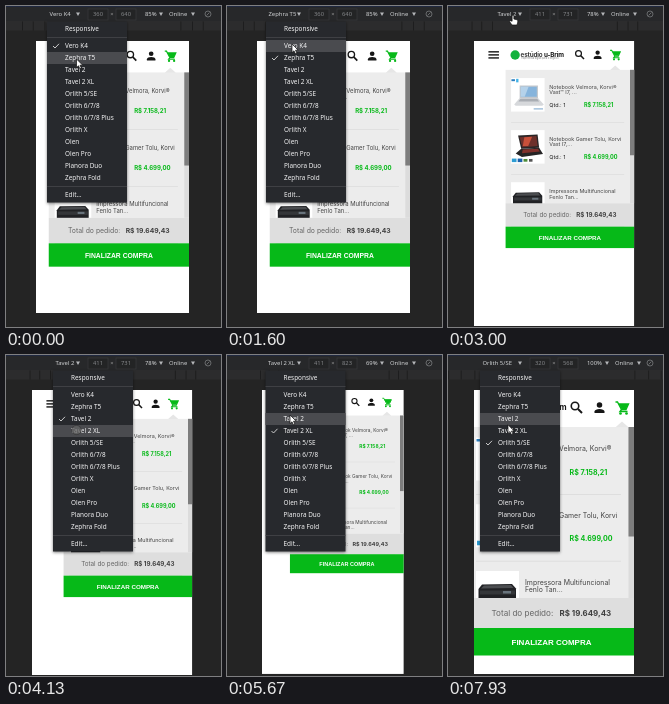
These frames come from a looping animation (215x321 px, 8000 ms). An HTML page:

```html
<!DOCTYPE html>
<html lang="pt">
<head>
<meta charset="utf-8">
<title>Device toolbar</title>
<style>
html, body { margin: 0; width: 100%; height: 100%; overflow: hidden; background: #242424; }
#stage { display: block; width: 215px; height: 321px; font-family: "Noto Sans", sans-serif; }
.shop { font-family: Inter, sans-serif; }
.button { font-family: "Liberation Sans", Arial, sans-serif; }
.menu { filter: drop-shadow(0 1px 1.5px rgba(0, 0, 0, .5)); }
</style>
</head>
<body>
<svg id="stage" viewBox="0 0 215 321"></svg>
<script>
const LOOP = 8000, TICKS = 120;
const CENTER = 106.5, PAGE_TOP = 35, MENU_WIDTH = 80;
const GREEN = '#06b918';

const NAMES = ['Vero K4', 'Zephra T5', 'Tavel 2', 'Tavel 2 XL', 'Orlith 5/SE', 'Orlith 6/7/8',
  'Orlith 6/7/8 Plus', 'Orlith X', 'Olen', 'Olen Pro', 'Planora Duo', 'Zephra Fold'];

// left: menu edge, gutter: extra header padding
const DEVICES = [
  { w: 360, h: 640, zoom: 85, left: 41, gutter: 20 },
  { w: 360, h: 640, zoom: 85, left: 39, gutter: 20 },
  { w: 411, h: 731, zoom: 78, left: 47, gutter: 25 },
  { w: 411, h: 823, zoom: 69, left: 38.5, gutter: 25 },
  { w: 320, h: 568, zoom: 100, left: 32, gutter: 0 },
];
const SWITCHES = [1, 32, 63, 96];
const OPENINGS = [[0, 1], [22, 32], [48, 63], [81, 96], [112, 120]];

// Pointer path: [tick, x, y]
const PATH = [
  [0, 70.5, 53], [8, 70.5, 53], [9, 66, 37], [11, 66, 37], [19, 62, 8], [21, 62, 8],
  [24, 65, 38], [28, 69, 63], [36, 69, 63], [40, 62, 34], [45, 65, 9], [47, 65, 9],
  [55, 68, 64], [57, 68, 64], [59, 70.5, 75], [66, 70.5, 75], [72, 62, 36], [77, 60, 7],
  [80, 60, 7], [85, 63, 60], [91, 70.5, 85], [98, 70.5, 85], [106, 57, 13], [115, 57, 13],
  [119, 60, 69.8],
];

const ITEMS = [
  { lines: ['Notebook Velmora, Korvi®', 'Vast™ I7, ...'], price: 'R$ 7.158,21' },
  { lines: ['Notebook Gamer Tolu, Korvi', 'Vast I7,...'], price: 'R$ 4.699,00' },
  { lines: ['Impressora Multifuncional', 'Fenlo Tan...'], price: '' },
];

const rect = (x, y, w, h, fill, more = '') =>
  `<rect x="${x}" y="${y}" width="${w}" height="${h}" fill="${fill}" ${more}/>`;
const path = (d, fill, more = '') => `<path d="${d}" fill="${fill}" ${more}/>`;
const line = (d, color, width) => path(d, 'none', `stroke="${color}" stroke-width="${width}"`);
const circle = (x, y, r, fill, more = '') => `<circle cx="${x}" cy="${y}" r="${r}" fill="${fill}" ${more}/>`;
const text = (x, middle, size, value, fill, more = '') =>
  `<text x="${x}" y="${middle + size * .36}" font-size="${size}" fill="${fill}" ${more}>${value}</text>`;
const group = (x, y, content, more = '') => `<g transform="translate(${x} ${y})" ${more}>${content}</g>`;
const BOLD = 'font-weight="700"';
const MIDDLE = 'text-anchor="middle"';

const PICTURES = [
  rect(1, 3, 9, 5, '#2b7fc0') + rect(13, 2, 6, 9, '#45b4e8') +
    path('M22 19H69V51H22Z', '#c3c7cc') + path('M25 22H66V48H25Z', '#86b4dc') +
    path('M25 22H45L35 48H25Z', '#b5d2ea') +
    path('M22 51H69L84 68L80 71H12L8 68Z', '#d6d8db') + path('M24 53H67L72 60H19Z', '#a9adb3') +
    rect(58, 77, 24, 4, '#a8c4dd'),
  path('M18 14L68 11L72 45L26 48Z', '#2a2627') + path('M22 18L65 15L68 41L29 44Z', '#6d302b') +
    path('M34 18L54 17L44 41L30 41Z', '#c9503a') +
    path('M26 48L72 45L82 61L28 69L12 60Z', '#252425') + path('M30 50L69 48L74 55L28 59Z', '#80312c') +
    rect(2, 73, 12, 9, '#2d9cd2') + rect(17, 73, 12, 9, '#1c62ad') + rect(32, 74, 10, 7, '#4d8b3a') +
    rect(46, 74, 9, 7, '#555'),
  path('M12 27L72 26L80 35V86H5V36Z', '#202124') + path('M16 29L70 28L75 34L10 35Z', '#4b4d50') +
    rect(8, 39, 70, 8, '#343639') + rect(54, 40, 16, 5, '#69747d'),
];

function header({ w, gutter }) {
  const menuX = 11 + gutter, cartX = w - 24 - gutter, ink = '#161616';
  const logoX = (menuX + 28 + cartX - 103) / 2 - 68;
  const bars = [26, 33.8, 41.6].map(y => rect(menuX + 1, y, 27, 3.6, ink)).join('');
  const logo = group(logoX, 35, circle(12, 1, 12, '#12b23c') +
    text(26, -1, 16.2, 'estúdio <tspan fill="#151515">u-Brim</tspan>', '#3b3b3b', BOLD + ' letter-spacing="-.4"') +
    text(28, 10, 6, 'experiência digital para o negócio', '#777'));
  const search = group(cartX - 91, 35,
    circle(-3, -3, 7.5, 'none', `stroke="${ink}" stroke-width="3.2"`) + line('M3 3L11 11', ink, 4));
  const user = group(cartX - 45, 35, circle(0, -5, 5.5, ink) + path('M-10 11V8C-10 1 10 1 10 8V11Z', ink));
  const cart = group(cartX, 35,
    line('M-13-11H-9L-1 4H8L13-7H-7M-1 4L-4 8H11', GREEN, 2.8) + path('M-7-7H13L8 3H-1Z', GREEN) +
    circle(-3, 12, 2.7, GREEN) + circle(9, 12, 2.7, GREEN));
  const caret = path(`M${cartX - 13} 74.5L${cartX} 63L${cartX + 13} 74.5Z`, '#e6e6e6');
  return bars + logo + search + user + cart + caret;
}

function cartItem({ lines, price }, i) {
  const content = rect(14, 21, 86, 86, '#fff') + group(14, 21, PICTURES[i]) +
    lines.map((value, n) => text(112, 43 + n * 15, 13.9, value, '#444')).join('') +
    text(112, 90, 14, 'Qtd.: 1', '#222') + text(201, 90, 14.2, price, GREEN, BOLD) +
    rect(14, 134, 290, 1.5, '#dadada');
  return group(0, 74 + i * 133.5, content);
}

function page(device) {
  const { w, h, zoom } = device, scale = zoom / 200;
  const panel = rect(0, 74, 330, 342, '#ececec') + ITEMS.map(cartItem).join('') +
    rect(319, 74, 11, 342, '#dcdcdc') + rect(319, 74, 11, 219, '#7d7d7d') +
    rect(0, 416, 330, 60, '#dedede') +
    text(45, 446, 16.2, 'Total do pedido:', '#666') + text(181, 446, 15.9, 'R$ 19.649,43', '#3f3f3f', BOLD) +
    rect(0, 476, 330, 55, GREEN) +
    text(165, 504, 16, 'FINALIZAR COMPRA', '#fff', `${BOLD} ${MIDDLE} class="button"`);
  const left = Math.floor(CENTER - w * scale / 2);
  return `<svg class="shop" x="${left}" y="${PAGE_TOP}" width="${w * scale}" height="${h * scale}" viewBox="0 0 ${w} ${h}">` +
    rect(0, 0, w, h, '#fff') + group(w - 330, 0, panel) + header(device) + '</svg>';
}

function toolbar(index) {
  const { w, h, zoom, left } = DEVICES[index], ink = '#d2d4d6';
  const shift = zoom === 100 ? 4 : 0;
  const arrow = x => path(`M${x - 2} 6.6h4l-2 3.4z`, '#b5b7ba');
  const field = (x, value) => rect(x - 10, 3, 20, 11, '#232425', 'stroke="#3a3b3d" stroke-width=".7"') +
    text(x, 8.3, 5.8, value, '#85878a', MIDDLE);
  const marks = [320, 375, 425].map(size => {
    const half = size * zoom / 400;
    return rect(CENTER - half, 15.5, .8, 9, '#1b1b1b') + rect(CENTER + half, 15.5, .8, 9, '#1b1b1b');
  }).join('');
  return rect(0, 0, 215, 15, '#27282a') + rect(0, 0, 215, 1, '#1f2840') + rect(0, 15, 215, 9.5, '#2c2c2d') + marks +
    text(left + 2.5, 8.3, 5.9, NAMES[index], ink) + arrow(72) +
    field(92, w) + text(106, 8.3, 5.8, '×', '#999', MIDDLE) + field(120, h) +
    text(139, 8.3, 5.9, zoom + '%', ink) + arrow(155 + shift) +
    text(163 + shift, 8.3, 5.9, 'Online', ink) + arrow(187 + shift) +
    group(202, 8, circle(0, 0, 3, 'none', 'stroke="#6f7173" stroke-width=".9"') + line('M-1.5 1.5L1.5-1.5', '#6f7173', .9));
}

function menu(index, y) {
  const { left } = DEVICES[index];
  const row = Math.floor((y - 34) / 12);
  const hoverY = y >= 34 ? 34 + row * 12 : y > 16.5 && y < 28.5 ? 16.5 : null;
  const entry = (value, middle) => text(18, middle, 6.4, value, '#f4f4f5');
  return group(left, 0,
    rect(0, 15.5, MENU_WIDTH, 181, '#27292d', 'class="menu"') +
    (hoverY === null ? '' : rect(0, hoverY, MENU_WIDTH, 12, '#4a4b4f')) +
    entry('Responsive', 22.5) + rect(0, 31, MENU_WIDTH, .7, '#4a4b4e') +
    NAMES.map((name, i) => entry(name, 40 + i * 12)).join('') +
    line(`M6 ${40 + index * 12}l2 2l4-4.2`, '#ddd', .9) +
    rect(0, 180.3, MENU_WIDTH, .7, '#4a4b4e') + entry('Edit…', 189));
}

const OUTLINE = 'stroke="#111" stroke-width=".7"';
const hand = path('M-.9 .8Q0-.6.9 .8V4L4 4.8Q5.2 5.2 4.8 7L4 10H-1L-3.4 6.6Q-3.4 5-.9 6.2Z', '#fff', OUTLINE);
const arrow = path('M0 0V8.6L2 6.8L3.4 9.8L4.9 9.1L3.5 6.2H6.2Z', '#fff', OUTLINE);
const touch = circle(0, 0, 4.6, 'rgba(100,100,100,.75)', 'stroke="rgba(50,50,50,.7)" stroke-width=".9"');

function pointerAt(tick) {
  const next = PATH.findIndex(([at]) => at >= tick);
  const [t1, x1, y1] = PATH[next], [t0, x0, y0] = PATH[Math.max(next - 1, 0)];
  const p = t1 > t0 ? (tick - t0) / (t1 - t0) : 1;
  return [x0 + (x1 - x0) * p, y0 + (y1 - y0) * p];
}

function render(tick) {
  const index = SWITCHES.filter(at => tick >= at).length;
  const open = OPENINGS.some(([from, to]) => tick >= from && tick < to);
  const [x, y] = pointerAt(tick);
  const pressed = tick > 0 && SWITCHES.includes(tick + 1);
  const overPage = !open && y > 26;
  const cursor = pressed || overPage ? touch : y > 15 ? arrow : hand;
  return rect(0, 0, 215, 321, '#242424') + page(DEVICES[index]) + toolbar(index) +
    (open ? menu(index, y) : '') + group(x, y, cursor);
}

const stage = document.getElementById('stage');
const start = performance.now();
let shown = -1;
function frame() {
  // The animation runs at 15 steps per second
  const elapsed = (performance.now() - start) % LOOP;
  const tick = Math.floor(elapsed * TICKS / LOOP + .1) % TICKS;
  if (tick !== shown) stage.innerHTML = render(shown = tick);
  requestAnimationFrame(frame);
}
frame();
</script>
</body>
</html>
```
